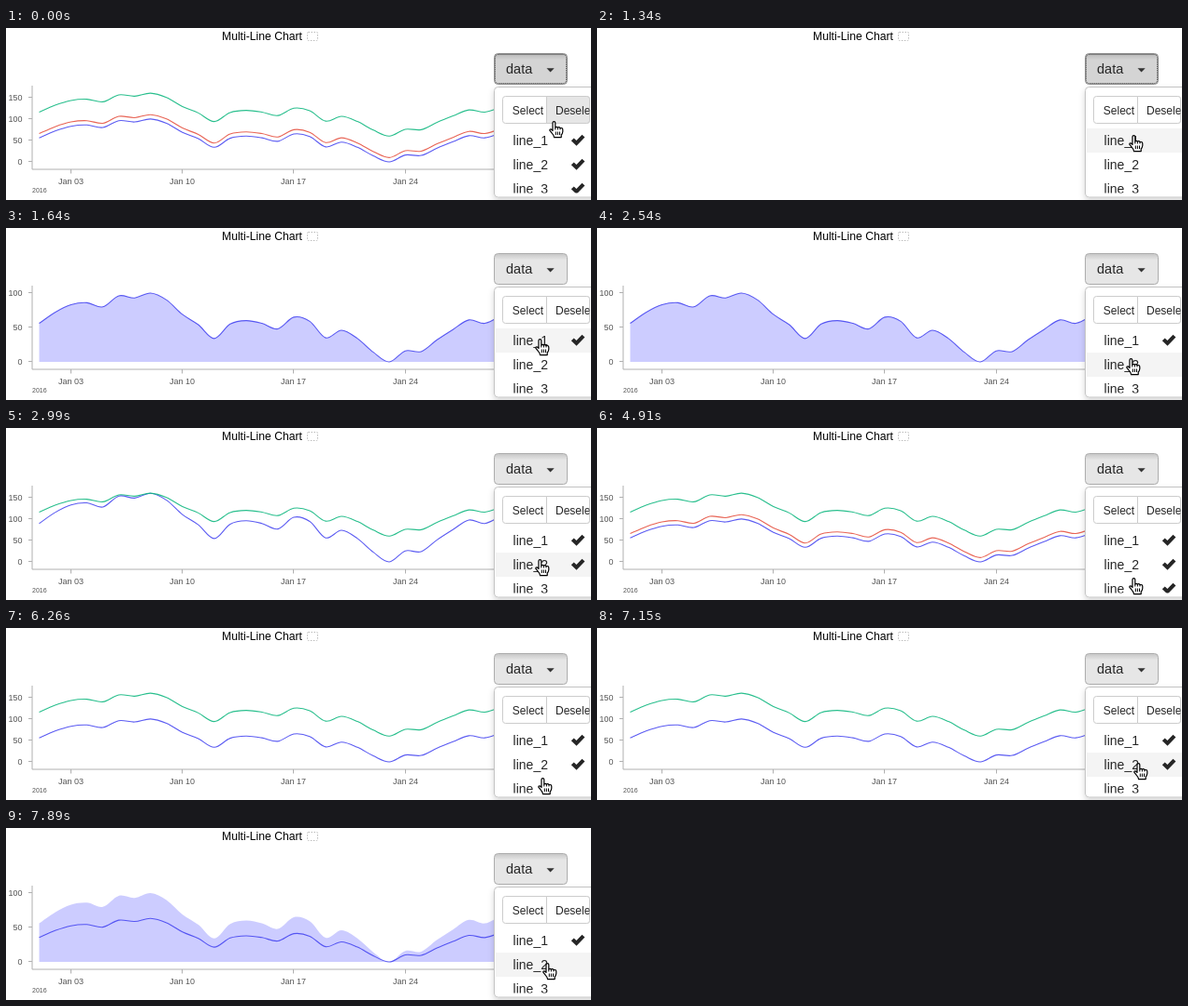
An HTML page that plays this animation: 626x185 px, repeating every 8 s.

```html
<!DOCTYPE html>
<html>
<head>
<meta charset="utf-8">
<style>
html, body { margin: 0; width: 100%; height: 100%; overflow: hidden; background: #fff; }
svg { display: block; font-family: "Liberation Sans", Arial, sans-serif; }
.tick { font-size: 9px; fill: #555; }
.axis { stroke: #b0b0b0; fill: none; }
.line { fill: none; stroke-width: 1.1; stroke-opacity: .87; }
.btn { stroke: #ccc; }
.menu { fill: #262626; font-size: 14px; }
</style>
</head>
<body>
<svg width="626" height="185" viewBox="0 0 626 185">
  <defs>
    <clipPath id="list"><path d="M524 106H626V177.5H524Z"/></clipPath>
    <clipPath id="edge"><path d="M532 70H624.5V106H532Z"/></clipPath>
    <filter id="shadow" x="-20%" y="-20%" width="140%" height="140%">
      <feDropShadow dx="0" dy="3" stdDeviation="3" flood-opacity=".17"/>
    </filter>
    <linearGradient id="inset" x2="0" y2="1">
      <stop offset="0" stop-opacity=".13"/><stop offset=".2" stop-opacity="0"/>
    </linearGradient>
  </defs>
  <text x="274" y="13" font-size="12.2" text-anchor="middle">Multi-Line Chart</text>
  <rect x="322.5" y="4.5" width="11" height="9" rx="1" fill="none" stroke="#bbb" stroke-dasharray="1.5 1.5"/>

  <g id="chart">
    <path class="axis" d="M28 62V152H626"/>
    <g id="xAxis"></g>
    <g id="yAxis"></g>
    <text class="tick" x="28" y="177" style="font-size:7px">2016</text>
    <path id="area" fill="#00f" opacity=".2"/>
    <path id="blue" class="line" stroke="#4343f0"/>
    <path id="green" class="line" stroke="#0ab67c"/>
    <path id="red" class="line" stroke="#e54e3c"/>
  </g>

  <rect id="button" x="522.5" y="27.5" width="78" height="33" rx="4"/>
  <rect x="523" y="28" width="77" height="32" rx="4" fill="url(#inset)"/>
  <rect id="focus" x="523.5" y="28.5" width="76" height="31" rx="3" fill="none" stroke="#444" stroke-dasharray="1 1"/>
  <text class="menu" x="535" y="49" style="font-size:14.5px">data</text>
  <path d="M578.5 43.3H586.7L582.6 47.4Z" fill="#333"/>

  <rect x="522.5" y="63.5" width="120" height="118.5" rx="4" fill="#fff" stroke="#c4c4c4" filter="url(#shadow)"/>
  <rect class="btn" x="531.5" y="73.5" width="93" height="29" rx="3" fill="#fff"/>
  <path id="deselect" class="btn" d="M578.5 73.5H621.5Q624.5 73.5 624.5 76.5V99.5Q624.5 102.5 621.5 102.5H578.5Z"/>
  <g class="menu" clip-path="url(#edge)" style="font-size:12px">
    <text x="541.8" y="92.5">Select</text>
    <text x="588" y="92.5">Deselect</text>
  </g>
  <g clip-path="url(#list)">
    <rect id="hover" x="524" width="102" height="26" fill="#f4f4f4"/>
    <g id="rows" class="menu"></g>
  </g>
  <g id="cursor" stroke="#000" stroke-linejoin="round">
    <path fill="#fff" stroke-width="1.2" d="M4 10.5V2Q4 .6 5.4 .6Q6.8 .6 6.8 2V7Q8 5.8 9.4 7Q11 6.2 12 7.6Q14.8 7 14.8 9.6V11.5Q14.6 13.5 13.2 15V17.6H5.6Q5.3 15.3 3.6 13.6L1 10.4Q.4 9 2 8.8Q3 8.9 4 10.5Z"/>
    <path fill="none" d="M7.3 11.5V15M9.4 11.5V15M11.5 11.5V15M6.8 7V9.5M9.4 7V9.5M12 7.6V9.5"/>
  </g>
</svg>
<script>
const $ = id => document.getElementById(id);
const set = (id, name, value) => $(id).setAttribute(name, value);
const show = (id, on) => $(id).style.display = on ? "" : "none";

const LOOP = 8000, STEP = 148.75; // the screen refreshes once per step
const BASE = 144, WIDE = 0.4616, TALL = 0.74; // zero line, pixels per unit
const ROW = 26, ROWS_TOP = 108;

// One value per day of January
const data = [56, 72, 83, 86, 80, 96, 93, 100, 90, 69, 54, 34, 55, 60, 56,
  48, 65, 59, 35, 46, 34, 14, 0, 16, 15, 32, 47, 61, 56, 67];

// Where the pointer heads, and the step at which it sets off
const stops = [
  { step: 0, x: 581, y: 100 },
  { step: 9, x: 566, y: 119 },
  { step: 16, x: 566, y: 141 },
  { step: 27, x: 569, y: 161 },
  { step: 45, x: 574, y: 145 }
];

function pointer(n) {
  const i = stops.filter(s => s.step <= n).length - 1;
  const to = stops[i], from = stops[i - 1] || to;
  const rest = 0.2 ** (n - to.step + 1);
  return ["x", "y"].map(a => Math.round(to[a] + (from[a] - to[a]) * rest));
}

function curve(shift, k) {
  const p = data.map((v, i) => [35.5 + i * 17.03, BASE - (v + shift) * k]);
  let d = "M" + p[0];
  for (let i = 1; i < p.length; i++) {
    const a = p[i - 2] || p[i - 1], b = p[i - 1], c = p[i], e = p[i + 1] || c;
    const out = [0, 1].map(n => b[n] + (c[n] - a[n]) / 6);
    const into = [0, 1].map(n => c[n] - (e[n] - b[n]) / 6);
    d += `C${out} ${into} ${c}`;
  }
  return d;
}

function yAxis(max, k) {
  let s = "";
  for (let v = 0; v <= max; v += 50) {
    const y = Math.round(BASE - v * k);
    s += `<path class="axis" d="M24 ${y - .5}H28"/>
      <text class="tick" x="17.5" y="${y + 3}" text-anchor="end">${v}</text>`;
  }
  return s;
}

function ease(u) {
  u = Math.min(1, Math.max(0, u));
  return u < .5 ? 4 * u ** 3 : 1 - 4 * (1 - u) ** 3;
}

$("xAxis").innerHTML = ["03", "10", "17", "24"].map((day, i) => {
  const x = Math.round(69 + i * 119.2) + .5;
  return `<path class="axis" d="M${x} 152V156.5"/>
    <text class="tick" x="${x}" y="167.5" text-anchor="middle">Jan ${day}</text>`;
}).join("");

$("rows").innerHTML = [0, 1, 2].map(i => `<g transform="translate(0 ${i * ROW})">
  <text x="542.6" y="126">line_${i + 1}</text>
  <path id="check${i}" d="M604.8 121.2L607.7 118.4L610.4 121L616.4 114.7L619.4 117.5L610.5 126.7Z"/></g>`).join("");

set("area", "d", curve(0, TALL) + `V${BASE}H35.5Z`);
set("green", "d", curve(60, WIDE));
set("red", "d", curve(10, WIDE));

function draw(n) {
  const within = (from, to) => n < 2 || (n >= from && n < to);
  const checked = [within(11, Infinity), within(20, 52), within(33, 42)];
  const [one, two, three] = checked;
  const alone = one && !two;
  checked.forEach((on, i) => show("check" + i, on));
  show("chart", one);
  show("area", alone);
  show("green", two);
  show("red", three);
  $("yAxis").innerHTML = alone ? yAxis(100, TALL) : yAxis(150, WIDE);

  // The blue line eases to each new scale
  const t = n * STEP;
  const tall = n < 11 ? 0 : 1 - ease((t - 2855) / 950) + ease((t - 7720) / 950);
  set("blue", "d", curve(0, WIDE + (TALL - WIDE) * tall));

  const [x, y] = pointer(n);
  set("cursor", "transform", `translate(${x} ${y})`);
  const row = Math.floor((y - ROWS_TOP) / ROW);
  show("hover", row === 0 || row === 1);
  set("hover", "y", ROWS_TOP + row * ROW);
  set("deselect", "fill", row < 0 ? "#e6e6e6" : "#fff");

  const focused = n < 11;
  show("focus", focused);
  set("button", "fill", focused ? "#d4d4d4" : "#e6e6e6");
  set("button", "stroke", focused ? "#8c8c8c" : "#adadad");
}

const start = performance.now();
let last = -1;
function frame() {
  const n = Math.floor((performance.now() - start) % LOOP / STEP);
  if (n !== last) draw(last = n);
  requestAnimationFrame(frame);
}
frame();
</script>
</body>
</html>
```
